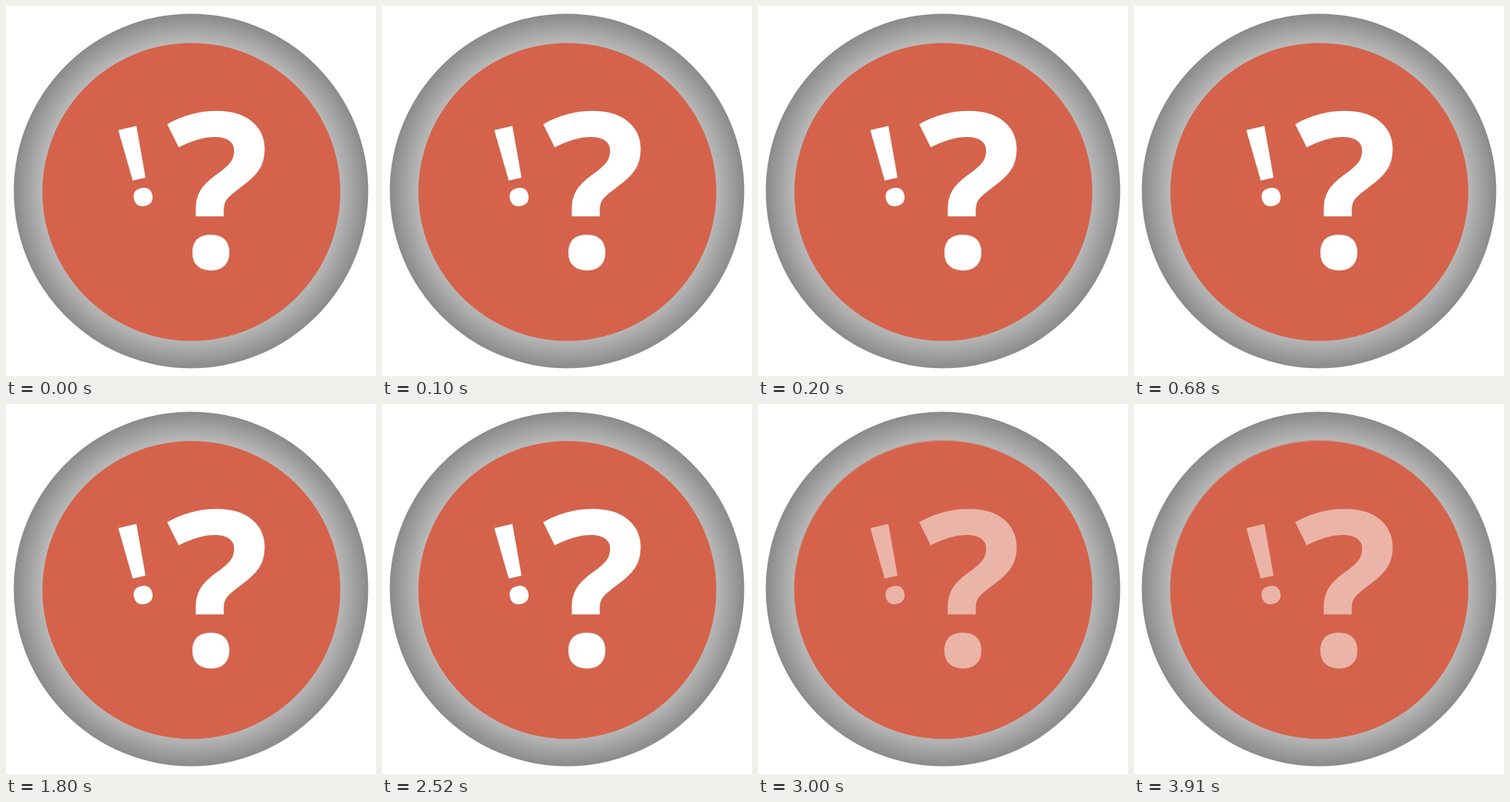
An HTML page that plays this animation: 500 by 500 pixels, repeating every 4520 ms.

```html
<!DOCTYPE html>
<html lang="en">
<head>
<meta charset="utf-8">
<title>Blinking punctuation badge</title>
<style>
  html, body { margin: 0; width: 100%; height: 100%; overflow: hidden; background: #fff; }
  svg { display: block; width: 100%; height: 100%; }
  text { font-family: "Open Sans", "Noto Sans", sans-serif; font-weight: 700; fill: #fff; }
</style>
</head>
<body>
<svg viewBox="0 0 500 500">
  <defs>
    <radialGradient id="rim" gradientUnits="userSpaceOnUse" cx="250" cy="250" r="239.5">
      <stop offset=".82" stop-color="#bebebe"/>
      <stop offset="1" stop-color="#8a8a8a"/>
    </radialGradient>
  </defs>
  <circle cx="250" cy="250" r="239.5" fill="url(#rim)"/>
  <circle cx="250.5" cy="251.2" r="201.3" fill="#d5634b"/>
  <text font-size="148.5" transform="translate(166.9 273.1) rotate(-13)">!</text>
  <text font-size="292.5" x="217" y="353.6">?</text>
  <circle id="veil" cx="250" cy="250.2" r="201.6" fill="#d5634b" fill-opacity=".48"/>
</svg>
<script>
  const LOOP = 4520;
  const veiled = [[1000, 1800], [3000, LOOP]];
  const veil = document.getElementById("veil");
  const start = performance.now();

  function draw(t) {
    const on = veiled.some(([from, to]) => t >= from && t < to);
    veil.setAttribute("visibility", on ? "visible" : "hidden");
  }

  function tick() {
    draw((performance.now() - start) % LOOP);
    requestAnimationFrame(tick);
  }
  tick();
</script>
</body>
</html>
```
